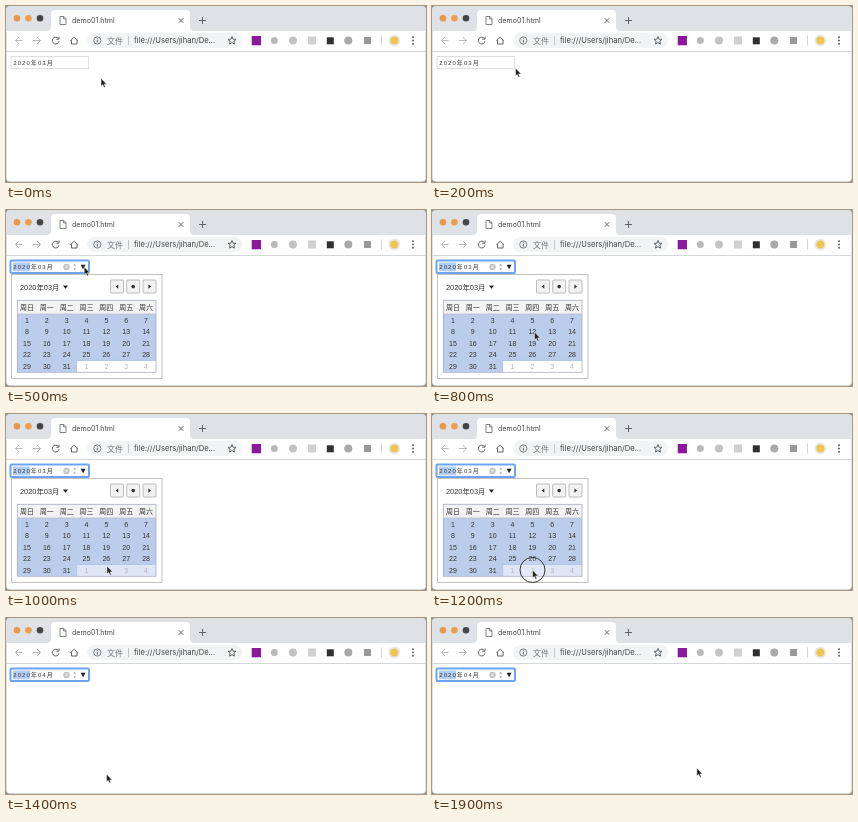
An HTML page that plays this animation: 420 by 176 pixels, repeating every 2 s.

```html
<!DOCTYPE html>
<html lang="zh">
<head>
<meta charset="utf-8">
<title>Month input</title>
<style>
html, body { margin: 0; width: 100%; height: 100%; overflow: hidden; background: #8c8c8c; }
svg { display: block; width: 420px; height: 176px; }
text { font-family: Inter, "Noto Sans CJK SC", "Noto Sans CJK", sans-serif; fill: #444; }
.line { fill: none; stroke: #5f6368; }
.pale { stroke: #b8babd; }
.thin { stroke-width: .8; }
.field { font: 6px "Liberation Sans", "Noto Sans CJK SC", "Noto Sans CJK", sans-serif; letter-spacing: 1.05px; fill: #333; }
.cal text { font: 7px "Liberation Sans", "Noto Sans CJK SC", "Noto Sans CJK", sans-serif; text-anchor: middle; fill: #333; }
.cal .title { font-size: 7.4px; text-anchor: start; }
.cal .next { fill: #b4b4b4; }
</style>
</head>
<body>
<svg viewBox="0 0 420 176">
  <rect width="420" height="176" rx="4" fill="#c6c6c6"/>
  <path d="M0 25V4Q0 0 4 0H416Q420 0 420 4V25Z" fill="#dee1e6"/>
  <path d="M.5 25H419.5V172Q419.5 175.3 416 175.3H4Q.5 175.3 .5 172Z" fill="#fff"/>
  <path d="M41 25Q45 25 45 21V8Q45 4 49 4H180Q184 4 184 8V21Q184 25 188 25Z" fill="#fff"/>
  <path d="M0 45.5H420" stroke="#d5d7da"/>

  <!-- tab strip -->
  <circle cx="11" cy="12.2" r="3.3" fill="#e8974c"/>
  <circle cx="22.4" cy="12.2" r="3.3" fill="#eb9f4a"/>
  <circle cx="34" cy="12.2" r="3.3" fill="#444545"/>
  <path class="line thin" d="M54 10.5H58L60 12.7V18.5H54ZM57.7 10.7V13H60"/>
  <text x="66" y="17.4" font-size="7.1">demo01.html</text>
  <path class="line" d="M172.7 12.2L177.3 16.8M177.3 12.2L172.7 16.8M193 14.5H200M196.5 11V18"/>

  <!-- toolbar -->
  <path class="line pale" d="M16.5 34.5H9.5M13 31L9.5 34.5L13 38"/>
  <path class="line pale" d="M27 34.5H34.5M31 31L34.5 34.5L31 38"/>
  <path class="line" d="M52.3 32.4A3.4 3.4 0 1 0 53 35.3M53 30.6V33.2H50.3"/>
  <path class="line" d="M64.3 34.8L68.2 31.2L72 34.8M65.5 34.2V38H71V34.2"/>
  <rect x="81" y="27" width="155" height="15" rx="7.5" fill="#f1f3f4"/>
  <circle class="line thin" cx="91.3" cy="34.5" r="3.6"/>
  <path class="line" d="M91.3 33.9V36.6M91.3 32.2V33.2"/>
  <text x="101" y="37.5" font-size="8" style="fill:#73777b">文件</text>
  <path d="M122.5 30V39" stroke="#c4c6c9"/>
  <text x="128" y="37.3" font-size="7.6">file:///Users/jihan/De...</text>
  <path id="star" class="line" stroke-linejoin="round"/>
  <rect x="245.7" y="30" width="9.3" height="9.3" fill="#8a1a9c"/>
  <circle cx="268.3" cy="34.5" r="3.5" fill="#b9b9b9"/>
  <circle cx="287" cy="34.5" r="4" fill="#c3c3c3"/>
  <rect x="302" y="30.5" width="8" height="8" fill="#d0d0d0"/>
  <rect x="320.8" y="31.3" width="7" height="7" fill="#303030"/>
  <circle cx="342.3" cy="34.5" r="4" fill="#a9a9a9"/>
  <rect x="358" y="31" width="7" height="7" fill="#999"/>
  <path d="M375.5 29.5V39.5" stroke="#d0d2d5"/>
  <circle cx="388.3" cy="34.5" r="6" fill="#e9e8ec"/>
  <circle cx="388.3" cy="34.5" r="4" fill="#edc64f"/>
  <g fill="#5f6368"><circle cx="407" cy="31.2" r="1"/><circle cx="407" cy="34.5" r="1"/><circle cx="407" cy="37.8" r="1"/></g>

  <!-- month field -->
  <rect id="idle" x="5" y="50.5" width="77.5" height="12" fill="#fff" stroke="#dedede"/>
  <g id="focus">
    <rect x="4.5" y="50.5" width="78.5" height="12.5" rx="1.2" fill="#fff" stroke="#6ea3f2" stroke-width="2"/>
    <rect x="7" y="52.5" width="17.3" height="8.8" fill="#b1cef5"/>
  </g>
  <text id="value" class="field" x="7.3" y="59.3"></text>
  <g id="controls">
    <circle cx="60.5" cy="56.9" r="3.2" fill="#c2c2c2"/>
    <path d="M59.2 55.6L61.8 58.2M61.8 55.6L59.2 58.2" stroke="#fff" stroke-width=".8"/>
    <path d="M67.2 55.5L68.7 53.7L70.2 55.5ZM67.2 58.4L68.7 60.2L70.2 58.4Z" fill="#a0a0a0"/>
    <path d="M74.6 54.8H79.6L77.1 59.3Z" fill="#222"/>
  </g>

  <g id="cal" class="cal">
    <rect x="5.5" y="64.5" width="150.5" height="104" fill="#fff" stroke="#c2c2c2"/>
    <text class="title" x="14" y="79.8">2020年03月</text>
    <path d="M57 75.5H62L59.5 78.7Z" fill="#222"/>
    <g fill="#f2f2f2" stroke="#b5b5b5" stroke-width=".9">
      <rect x="104.5" y="70" width="13" height="13" rx="1"/>
      <rect x="120.7" y="70" width="13" height="13" rx="1"/>
      <rect x="137" y="70" width="13" height="13" rx="1"/>
    </g>
    <path d="M112.3 74.5V78.7L109.6 76.6ZM142.4 74.5V78.7L145.1 76.6Z" fill="#333"/>
    <circle cx="127.2" cy="76.6" r="1.8" fill="#333"/>
    <rect x="11" y="90" width="139" height="14" fill="#f3f3f3"/>
    <path d="M11 104H150V150.4H70.6V162H11Z" fill="#bccdec"/>
    <rect id="hover" x="70.6" y="150.4" width="79.4" height="11.6" fill="#dfe7f6"/>
    <rect x="11.3" y="90.3" width="138.7" height="72" fill="none" stroke="#a9b0bf" stroke-width=".8"/>
    <path d="M11 104H150" stroke="#b8bdc9" stroke-width=".8"/>
    <path d="M150 150.4H70.6V162" fill="none" stroke="#9db6e6" stroke-width=".7"/>
  </g>

  <g id="pointer">
    <circle id="ring" r="12.5" fill="#fff" fill-opacity=".15" stroke="#333"/>
    <path d="M0 0V8L1.8 6.4L3.1 9.3L4.4 8.7L3.2 5.9H5.7Z" fill="#222" stroke="#fff" stroke-width=".5"/>
  </g>
</svg>
<script>
const el = id => document.getElementById(id);
const show = (id, on) => el(id).style.display = on ? "" : "none";

function addText(x, y, label, cls = "") {
  const t = document.createElementNS("http://www.w3.org/2000/svg", "text");
  t.setAttribute("x", x);
  t.setAttribute("y", y);
  t.setAttribute("class", cls);
  t.textContent = label;
  el("cal").append(t);
}

const colX = c => 11 + 139 / 7 * (c + .5);
[..."日一二三四五六"].forEach((d, c) => addText(colX(c), 99.8, "周" + d));
for (let i = 0; i < 35; i++) {
  const next = i > 30;
  addText(colX(i % 7), 112.5 + 11.6 * Math.floor(i / 7), next ? i - 30 : i + 1, next ? "next" : "");
}

const starPoints = Array.from({ length: 10 }, (_, i) => {
  const a = i * Math.PI / 5, r = i % 2 ? 1.9 : 4.2;
  return [226 + r * Math.sin(a), 34.7 - r * Math.cos(a)];
});
el("star").setAttribute("d", "M" + starPoints.join("L") + "Z");

// Pointer moves: [time, x, y], held until the next entry.
const moves = [
  [0, 95, 72.3], [100, 91, 69], [200, 83.5, 62], [300, 78.2, 56.8],
  [700, 88, 85], [800, 102.5, 122], [900, 102, 139], [1000, 101, 152],
  [1100, 100.5, 156], [1800, 190, 154], [1900, 264.8, 150]
];
const LOOP = 2000;
const start = performance.now();

function draw(now) {
  const t = Math.max(0, now - start) % LOOP;
  const within = (a, b) => t >= a && t < b;
  const [, x, y] = moves.filter(m => m[0] <= t).pop();
  el("pointer").setAttribute("transform", `translate(${x} ${y})`);
  show("ring", within(400, 500) || within(1200, 1300));
  show("focus", t >= 400);
  show("idle", t < 400);
  show("controls", t >= 300);
  show("cal", within(500, 1300));
  show("hover", within(1000, 1300));
  el("value").textContent = t < 1300 ? "2020年03月" : "2020年04月";
  requestAnimationFrame(draw);
}
draw(start);
</script>
</body>
</html>
```
